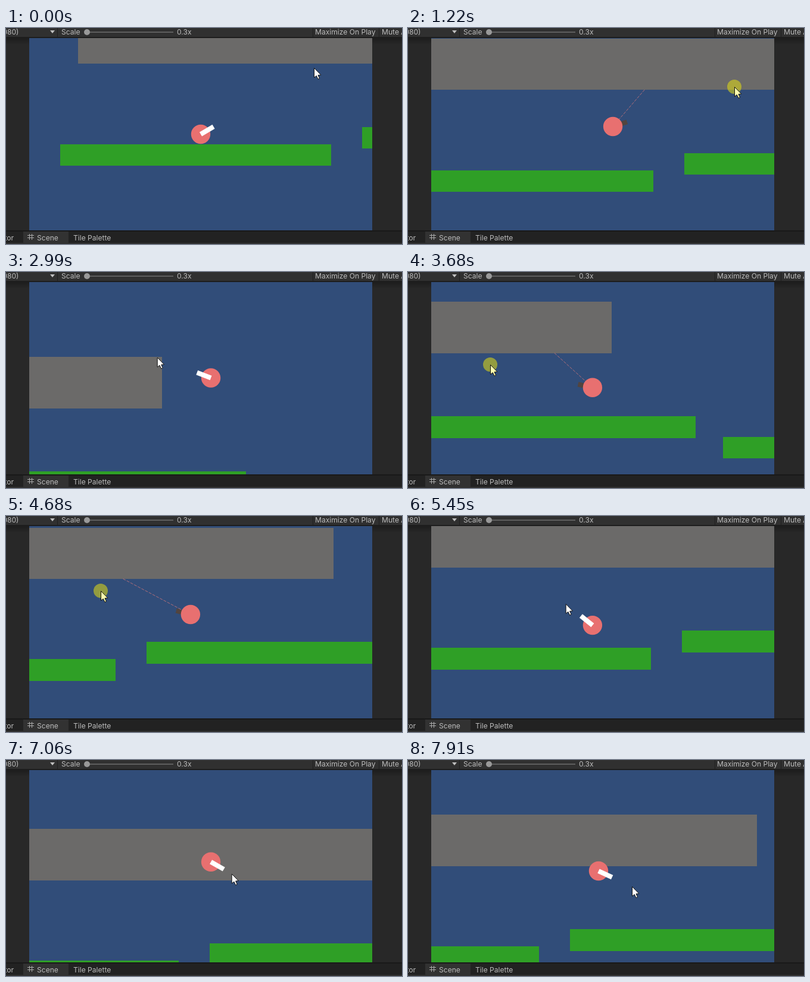
These frames come from a looping animation (665 by 364 pixels, 7.99 s). An HTML page with a canvas:

```html
<!DOCTYPE html>
<html lang="en">
<head>
<meta charset="utf-8">
<style>
  html, body { margin: 0; width: 100%; height: 100%; overflow: hidden; background: #282828; }
  canvas { display: block; }
</style>
</head>
<body>
<canvas id="stage" width="665" height="364"></canvas>
<script>
const ctx = document.getElementById('stage').getContext('2d');
const LOOP = 7990, STEP = 1000 / 13;
const START = { x: 327, y: 179 };   // the camera keeps the ball near this point
const LAG = 117;                    // the camera shows the ball's mean place over this time
const CEILING = 60;

// The ball runs at a constant speed and turns around; [time, position] at each change of speed.
const ballX = [[704, 327], [3141, 1038], [3720, 869], [4420, 749], [5998, 288], [7420, 703], [7740, 667], [7990, 637]];
const ballY = [[800, 179], [1104, 148], [1221, 122], [2181, 127], [2298, 93], [2560, 20], [2980, 8], [3440, 53],
  [3700, 123], [3990, 122], [4566, 146], [4683, 120], [5000, 118], [5700, 179], [6450, 179], [6900, 50], [7300, 0],
  [7700, 39], [7990, 79]];
const mouse = [[374, 517, 67], [450, 511, 77], [700, 511, 77], [1221, 548, 99], [2298, 546, 123], [3200, 165, 150],
  [3683, 138, 156], [4683, 159, 126], [6298, 381, 172], [7913, 376, 213]];
// Time shot, time let go, place on the ceiling.
const ropes = [[830, 1430, 531], [1620, 2370, 763], [3250, 3800, 816], [3940, 4770, 559]];

function along(path, t, column = 1) {
  const next = path.findIndex(key => key[0] > t);
  if (next === 0) return path[0][column];
  if (next < 0) return path[path.length - 1][column];
  const a = path[next - 1], b = path[next];
  return a[column] + (b[column] - a[column]) * (t - a[0]) / (b[0] - a[0]);
}

function follow(path, t) {
  const samples = 24;
  let sum = 0;
  for (let i = 0; i < samples; i++) sum += along(path, t - LAG * (i + 0.5) / samples);
  return sum / samples;
}

// Edges snap to whole pixels.
function block(color, left, top, right, bottom) {
  const [l, t, r, b] = [left, top, right, bottom].map(Math.round);
  ctx.fillStyle = color;
  ctx.fillRect(l, t, r - l, b - t);
}

function rect(color, x, y, w, h) {
  ctx.fillStyle = color;
  ctx.fillRect(x, y, w, h);
}

function disc(color, x, y, r) {
  ctx.fillStyle = color;
  ctx.beginPath();
  ctx.arc(x, y, r, 0, Math.PI * 2);
  ctx.fill();
}

function polygon(color, points) {
  ctx.fillStyle = color;
  ctx.beginPath();
  points.forEach(([x, y]) => ctx.lineTo(x, y));
  ctx.closePath();
  ctx.fill();
}

function label(text, x, y, align = 'left') {
  ctx.font = '12.08px Inter, Roboto, sans-serif';
  ctx.textAlign = align;
  ctx.fillStyle = '#bcbcbc';
  ctx.fillText(text, x, y);
}

function drawEditor() {
  rect('#282828', 0, 0, 665, 364);
  const shade = ctx.createLinearGradient(0, 16, 0, 28);
  shade.addColorStop(0, '#1c1c1c');
  shade.addColorStop(1, '#282828');
  rect(shade, 0, 16, 665, 12);
  rect('#303030', 0, 0, 665, 15);
  rect('#1d1d1d', 0, 15, 665, 2);
  for (const x of [86, 515, 626]) rect('#1f1f1f', x, 0, 1, 15);
  label('080)', 21.5, 11, 'right');
  polygon('#c0c0c0', [[74, 4], [82, 4], [78, 9]]);
  label('Scale', 93, 11);
  rect('#5e5e5e', 140, 6, 141, 2);
  disc('#999', 136, 7, 5);
  label('0.3x', 287, 11);
  label('Maximize On Play', 519, 11);
  label('Mute A', 631, 11);

  rect('#191919', 0, 341, 665, 2);
  rect('#222', 0, 343, 665, 19);
  rect('#323232', 29, 343, 76, 19);
  rect('#303030', 0, 362, 665, 2);
  label('tor', 13, 358, 'right');
  for (const k of [0, 4]) {
    rect('#aaa', 39 + k, 347, 1, 10);
    rect('#aaa', 36, 349 + k, 11, 1);
  }
  label('Scene', 52, 358);
  label('Tile Palette', 113, 358);
}

function drawGun(color, x, y, angle) {
  ctx.save();
  ctx.translate(x, y);
  ctx.rotate(angle);
  rect(color, 0, -4, 25, 8);
  ctx.restore();
}

function drawCursor(x, y, fill) {
  ctx.save();
  ctx.translate(x + 0.5, y + 0.5);
  polygon(fill, [[0, 0], [0, 16], [3.8, 13], [6.5, 18.7], [9, 17.5], [6.5, 12], [11.3, 11.6]]);
  ctx.strokeStyle = '#111';
  ctx.lineWidth = 1;
  ctx.stroke();
  ctx.restore();
}

function drawGame(t) {
  const worldX = along(ballX, t), worldY = along(ballY, t);
  const camX = START.x - follow(ballX, t), camY = START.y - follow(ballY, t);
  const x = worldX + camX, y = worldY + camY;
  const mx = along(mouse, t, 1), my = along(mouse, t, 2);
  const rope = ropes.find(([shot, released]) => t >= shot && t < released);
  const aim = Math.atan2(my - y, mx - x);

  ctx.save();
  ctx.beginPath();
  ctx.rect(39, 17, 576, 324);
  ctx.clip();
  rect('#314d79', 39, 17, 576, 324);
  block('#6b6a69', 121 + camX, CEILING - 86.2 + camY, 912 + camX, CEILING + camY);
  for (const [left, top] of [[91, 195.6], [598, 166.6], [1099, 201]]) {
    block('#2f9f26', left + camX, top + camY, left + 455 + camX, top + 36.4 + camY);
  }

  if (rope) {
    drawGun('#51443f', x, y, aim);
    ctx.strokeStyle = '#d0777a';
    ctx.lineWidth = 0.8;
    ctx.setLineDash([5, 2]);
    ctx.beginPath();
    ctx.moveTo(rope[2] + camX, CEILING + camY);
    ctx.lineTo(x, y);
    ctx.stroke();
    ctx.setLineDash([]);
  }
  disc('#e87070', x, y, 16.2);
  if (!rope) drawGun('#fff', x, y, aim);
  ctx.restore();

  if (rope) disc('rgba(225, 220, 20, .56)', mx, my, 12);
  drawCursor(mx, my, rope ? '#ffffb0' : '#fff');
}

function frame(now) {
  const left = LOOP - now % LOOP;
  const t = Math.max(0, LOOP - Math.ceil((left - 8) / STEP) * STEP);
  drawEditor();
  drawGame(t);
  requestAnimationFrame(frame);
}
requestAnimationFrame(frame);
</script>
</body>
</html>
```
